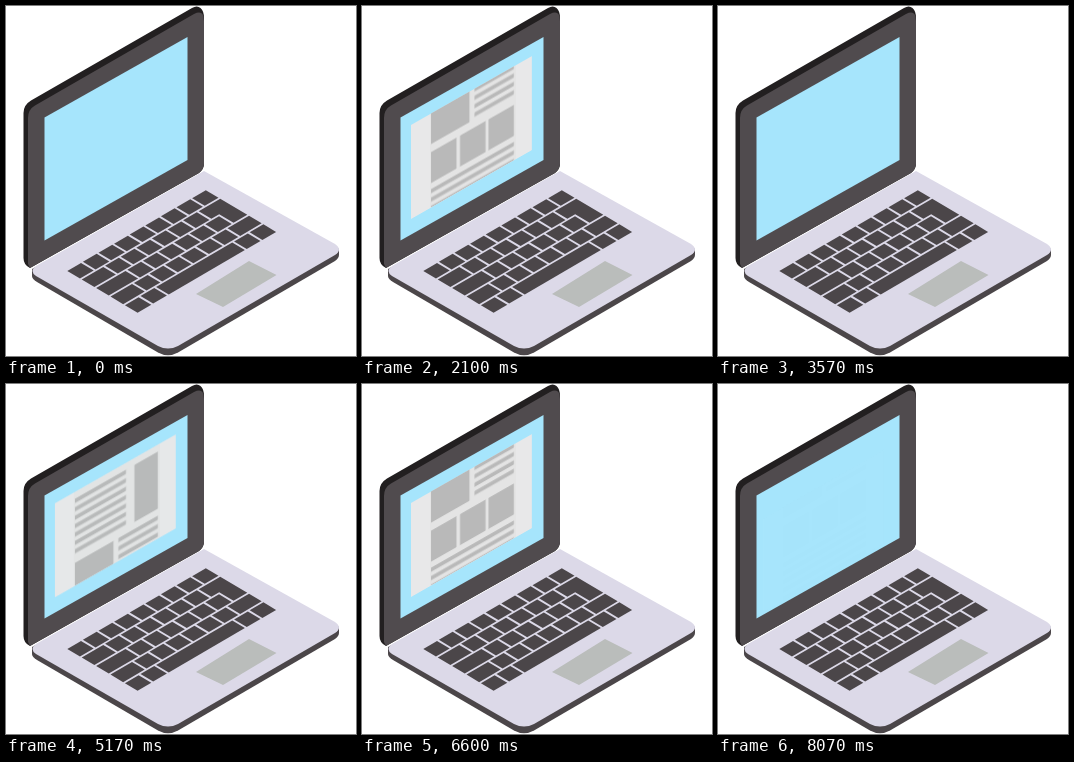
An HTML page that plays this animation: 350 by 350 pixels, repeating every 9010 ms.

```html
<!DOCTYPE html>
<html lang="en">
<head>
<meta charset="utf-8">
<title>Laptop with scrolling page</title>
<style>
  html, body { margin: 0; width: 100%; height: 100%; overflow: hidden; background: #fff; }
  svg { display: block; width: 100vw; height: 100vh; }
  .page, .scroll { animation: 4505ms linear infinite; }
  .page { animation-name: show; }
  .scroll { animation-name: scroll; }

  @keyframes show {
    0%, 1.55% {
      opacity: 0; transform: translate(-4px, 16px);
      animation-timing-function: cubic-bezier(.25, 1, .5, 1);
    }
    21.53% { opacity: 1; transform: none; }
    63.3% {
      opacity: 1; transform: none;
      animation-timing-function: cubic-bezier(.5, 0, .75, 0);
    }
    79.24%, 100% { opacity: 0; transform: translate(-4px, 16px); }
  }
  @keyframes scroll {
    0%, 22.2% {
      transform: translateY(0);
      animation-timing-function: cubic-bezier(.25, 1, .5, 1);
    }
    42.17%, 42.84% {
      transform: translateY(-46px);
      animation-timing-function: cubic-bezier(.25, 1, .5, 1);
    }
    62.82%, 100% { transform: translateY(-92px); }
  }
</style>
</head>
<body>
<svg viewBox="0 0 350 350">
  <defs>
    <clipPath id="sheet"><path d="M0 0H121V94H0Z"/></clipPath>
  </defs>

  <!-- base -->
  <path fill="#4b4649" d="M26 263L198 172L333 243V249Q333 252 329 255L172 346.5Q162 352 152 346.5L31 276Q26 273 26 270Z"/>
  <path fill="#dcd9e8" d="M198 165L329 238Q337 243.5 329 249L172 340Q162 345 152 340L30 270Q23 265 30 260Z"/>
  <path fill="#babdbb" d="M190 288L243 255L270.5 269L217 301Z"/>
  <g id="keys" fill="#4b4649" transform="matrix(15.6 -9.1 14.4 8.55 59.5 265)"></g>

  <!-- lid -->
  <path fill="#221f20" d="M17.5 107Q17.5 99 25 94.5L186 2Q191 -1 194.5 2Q198 5 198 12V158Q198 163 193 167L24 262Q17.5 259 17.5 252Z"/>
  <path fill="#504b4e" d="M22 112Q22 103.500 29 99.500L188 8Q198 3 198 15V158Q198 163 193 167L24 262L22 258Z"/>
  <path fill="#a6e5fc" d="M38.500 111.500L181.500 31V154L38.500 234.500Z"/>

  <g class="page">
    <g transform="matrix(1 -.57 0 1 49 119)">
      <path fill="#e8e8e9" d="M0 0H121V94H0Z"/>
      <path fill="#e4e4e4" d="M19 0H105V94H19Z"/>
      <g clip-path="url(#sheet)">
        <g class="scroll" id="content" fill="#b9b9b9"></g>
      </g>
    </g>
  </g>
</svg>
<script>
  const NS = 'http://www.w3.org/2000/svg';

  function rect(parent, x, y, width, height) {
    const el = document.createElementNS(NS, 'rect');
    Object.entries({ x, y, width, height }).forEach(([k, v]) => el.setAttribute(k, v));
    parent.append(el);
  }

  // Keyboard: key widths per row, in key units
  const keys = document.getElementById('keys');
  const six = Array(6).fill(1);
  const rows = [
    [...six, 1, 1, 1],
    [1.5, ...six],
    [2, ...six],
    [1.5, ...six, 1.5],
    [1, 1, 5, 1, 1]
  ];
  rows.forEach((row, y) => {
    let x = 0;
    for (const w of row) {
      rect(keys, x + .06, y + .06, w - .12, .88);
      x += w;
    }
  });
  const enter = document.createElementNS(NS, 'path');
  enter.setAttribute('d', 'M7.56 1.06H8.94V2.94H8.06V1.94H7.56Z');
  keys.append(enter);

  // Page content
  const content = document.getElementById('content');
  const lines = (x, y, w, n) => {
    for (let i = 0; i < n; i++) rect(content, x, y + i * 8.4, w, 4.2);
  };
  lines(20, 7, 51, 7);
  rect(content, 79.5, 7, 23.5, 57);
  rect(content, 20, 71, 38.5, 32);
  lines(63.5, 71, 39.5, 4);
  for (const x of [20, 49, 77.5]) rect(content, x, 111, 25.5, 31);
  lines(20, 148, 83, 5);
</script>
</body>
</html>
```
